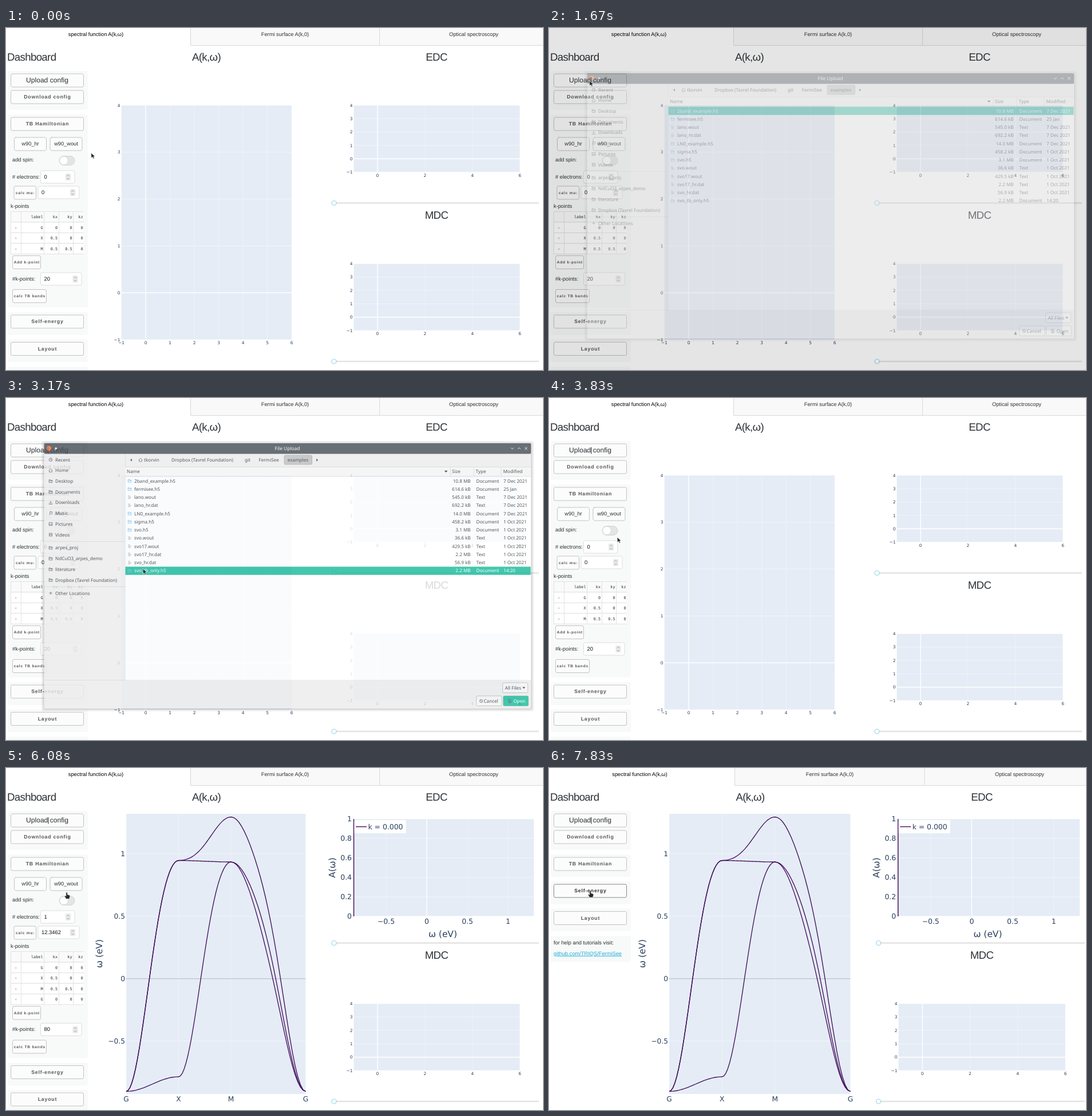
Animation of 938 by 597 pixels, one loop 8 s. Source, as an HTML page:

```html
<!DOCTYPE html>
<html lang="en">
<head>
<meta charset="utf-8">
<title>Spectral function dashboard</title>
<style>
  html, body { margin: 0; width: 100%; height: 100%; overflow: hidden; background: #fff; }
  svg { display: block; width: 938px; height: 597px; font-family: "Liberation Sans", Arial, sans-serif; fill: #2c3136; text-rendering: geometricPrecision; }
  text { white-space: pre; }
  .plot { font-family: "DejaVu Sans", sans-serif; fill: #2a3f5f; }
  .mono { font-family: "DejaVu Sans Mono", monospace; }
  .dialog { font-family: "Noto Sans", sans-serif; fill: #33383c; }
  .btn { font-weight: bold; fill: #555; }
  .btn rect { stroke: #c2c2c2; }
  .btn.on { fill: #333; }
  .btn.on rect { stroke: #888; }
</style>
</head>
<body>
<svg id="stage" viewBox="0 0 938 597"></svg>
<script>
const ANCHOR = { s: 'start', m: 'middle', e: 'end' };
const BG = '#e5ecf6', INK = '#440f5c', TEAL = '#1cbb9b';

// Text is placed by its vertical centre.
const T = (x, y, s, size = 9.27, a = 's', extra = '') =>
  `<text x="${x}" y="${y + size * .36}" font-size="${size}" text-anchor="${ANCHOR[a]}" ${extra}>${s}</text>`;
const R = (x, y, w, h, fill, stroke = 'none', r = 0, extra = '') =>
  `<rect x="${x}" y="${y}" width="${w}" height="${h}" rx="${r}" fill="${fill}" stroke="${stroke}" ${extra}/>`;
const P = (d, stroke, w = 1, extra = '') =>
  `<path d="${d}" fill="none" stroke="${stroke}" stroke-width="${w}" ${extra}/>`;
const G = (id, body, cls = '', extra = '') => `<g id="${id}" class="${cls}" ${extra}>${body}</g>`;

// ---- page ----
const heading = (x, y, s, a = 'm') => T(x, y, s, 18.6, a, 'letter-spacing="-.62"');
const slider = (x, y, x2) =>
  R(x, y - 1.2, x2 - x, 2.4, '#e3e3e3', 'none', 1.2) +
  `<circle cx="${x}" cy="${y}" r="4" fill="#fff" stroke="#96d5f0" stroke-width="1.2"/>`;

function plot({ x, xr, y, yr, xt, yt, size, gap = 6, pad = 2, names, zero = '#fff' }) {
  const [x0, x1] = x, [y0, y1] = y;
  const px = v => x0 + (v - xr[0]) / (xr[1] - xr[0]) * (x1 - x0);
  const py = v => y1 - (v - yr[0]) / (yr[1] - yr[0]) * (y1 - y0);
  const label = v => String(v).replace('-', '\u2212');
  let s = R(x0, y0, x1 - x0, y1 - y0, BG);
  xt.forEach((v, i) => {
    const isZero = !names && v === 0;
    s += P(`M${px(v)} ${y0}V${y1}`, '#fff', isZero ? 1.4 : .7, `opacity="${isZero ? 1 : .5}"`);
    s += T(px(v), y1 + gap, names ? names[i] : label(v), size, 'm');
  });
  yt.forEach(v => {
    s += P(`M${x0} ${py(v)}H${x1}`, v ? '#fff' : zero, v ? .7 : 1.4, `opacity="${v ? .65 : 1}"`);
    s += T(x0 - pad, py(v), label(v), size, 'e');
  });
  return s;
}
const emptyPlot = (x, y, xt) => plot({ x, y, xr: [-1, 6], yr: [-1, 4], xt, yt: [-1, 0, 1, 2, 3, 4], size: 7.4, gap: 5.5 });
const upright = (x, y, s) => `<g transform="translate(${x} ${y})rotate(-90)">${T(0, 0, s, 15.4, 'm')}</g>`;

function base(w) {
  const [a, b] = w ? [324.5, 656] : [322.5, 652.5];
  const mid = w ? 756 : 752;
  return R(a, -1, 620, 31.5, '#f9f9f9') + P(`M${a} 0V30.5H938M${b} 0V30`, '#d9d9d9') +
    T(w ? 158.5 : 157, 10.5, 'spectral function A(k,ω)', 9.27, 'm', 'fill="#000"') +
    T(w ? 490.5 : 487.5, 10.5, 'Fermi surface A(k,0)', 9.27, 'm') +
    T(w ? 822 : 817, 10.5, 'Optical spectroscopy', 9.27, 'm') +
    heading(w ? 351.5 : 350, 50.4, 'A(k,ω)') + heading(mid, 50.4, 'EDC') + heading(mid, 326.4, 'MDC') +
    [305.5, 582].map(y => slider(w ? 575.5 : 573, y, w ? 936 : 931)).join('') +
    `<g class="plot">${emptyPlot(w ? [610.5, 902] : [607.5, 897.5], [411.5, 528], [0, 2, 4, 6])}</g>`;
}

// Heights at G, X, M, G, then the [second, third] harmonic weights of each segment.
const BANDS = [
  [[564.5, 161.5, 85.5, 564.5], [[.08, 0], [-.13, 0], [-.16, .09]]],
  [[564.5, 161.5, 164, 564.5], [[.08, 0], [0, 0], [-.075, .06]]],
  [[564.5, 539, 164, 564.5], [[0, 0], [.08, 0], [-.14, .06]]]
];
const KPTS = [0, .2915, .584, 1];

function bandPlot(w) {
  const x = [210, w ? 526.5 : 523.5];
  let s = plot({ x, xr: [0, 1], y: [80, 569], yr: [-.923, 1.32], xt: KPTS, names: [...'GXMG'],
    yt: [-.5, 0, .5, 1], size: 12.2, gap: 9, zero: '#c3ccd2' });
  const N = 28;
  for (const [e, c] of BANDS) {
    const pts = [];
    for (let k = 0; k < 3; k++) for (let i = 0; i <= N; i++) {
      const q = Math.PI * i / N, cos = Math.cos(q);
      const f = (1 - cos) / 2 + (c[k][0] + c[k][1] * cos) * Math.sin(q) ** 2;
      const u = KPTS[k] + (KPTS[k + 1] - KPTS[k]) * i / N;
      pts.push((x[0] + u * (x[1] - x[0])).toFixed(2) + ' ' + (e[k] + (e[k + 1] - e[k]) * f).toFixed(2));
    }
    s += P('M' + pts.join('L'), INK, 1.35);
  }
  return s + upright(162.6, 324, 'ω (eV)');
}

function edcPlot(w) {
  const x0 = w ? 609.7 : 607.5, x1 = w ? 927 : 922;
  return plot({ x: [x0, x1], xr: [-.898, 1.317], y: [89, 259], yr: [0, 1], xt: [-.5, 0, .5, 1],
      yt: [0, .2, .4, .6, .8, 1], size: 12.4, gap: 9, pad: 3.5 }) +
    P(`M${x0} 89V259`, INK, 1.5) + R(x0 + 1, 91, 90, 23, '#fff') + P(`M${x0 + 3.5} 102.5h19`, INK, 1.4) +
    T(x0 + 25, 102.5, 'k = 0.000', 12.4) + T(w ? 766.5 : 763, 289.2, 'ω (eV)', 15.4, 'm') +
    upright(x0 - 37.8, 174, 'A(ω)');
}

// ---- dashboard ----
const panel = (y, h, extra = '') => R(3, y, 140, h, '#f8faf9', 'none', 3, extra);
const button = (id, x, y, w, s, size = 8.76) => G(id,
  R(x, y, w, 23, '#fbfcfb', '', 2.5) + T(x + w / 2 + .4, y + 11.2, s, size, 'm', 'letter-spacing=".8"'), 'btn');
const dashed = (x, y, w, s, size) =>
  R(x, y, w, 23, '#fbfcfb', '#888', 3, 'stroke-dasharray="1.3 1.3"') + T(x + w / 2, y + 11, s, size, 'm');
function input(id, x, y, w, value, cx) {
  const cy = y + 11.3;
  return R(x, y, w, 22, '#fff', '#dcdcdc', 2.5) + T(x + 6, cy - .8, value, 9.4, 's', `id="${id}" fill="#111"`) +
    R(cx - 4.5, cy - 6, 9, 12, '#e9e9e9', 'none', 1) +
    P(`M${cx - 2.2} ${cy - 1.6}l2.2 -2.2l2.2 2.2M${cx - 2.2} ${cy + 1.6}l2.2 2.2l2.2 -2.2`, '#888', .8);
}

const ROWS = [['label', 'kx', 'ky', 'kz'], ['G', '0', '0', '0'], ['X', '0.5', '0', '0'], ['M', '0.5', '0.5', '0'], ['G', '0', '0', '0']];
const COL = [64.5, 90, 115.5, 134.5];
const tableRow = (cells, i) => {
  const y = 320.5 + 18.5 * i;
  return G('row' + i, R(8.5, y, 127, 18.5, i ? '#fff' : '#fafafa') +
    P(`M136 ${y}H8.5V${y + 18.5}H136M26.5 ${y}v18.5M66.5 ${y}v18.5M92.5 ${y}v18.5M117.5 ${y}v18.5`, '#dcdcdc', .8) +
    (i ? T(17.3, y + 9.2, '×', 6.5, 'm', 'fill="#aaa"') : '') +
    cells.map((c, j) => T(COL[j], y + 9.2, c, 6.8, 'e')).join(''), 'mono');
};

const dashboard =
  heading(2, 50.4, 'Dashboard', 's') +
  panel(75, 68) + dashed(8.5, 80, 127, 'Upload config', 12.1) + button('dl', 8.5, 109, 127, 'Download config') +
  P('M74 86V97.5', '#222', 1, 'id="caret"') +
  panel(151, 337, 'id="tbPanel"') + button('tb', 8.5, 156, 127, 'TB Hamiltonian') +
  `<clipPath id="fold"><rect id="foldBox" x="0" y="180" width="143" height="330"/></clipPath>` +
  G('tbBody',
    dashed(14.5, 191, 56, 'w90_hr') + dashed(77, 191, 56, 'w90_wout') +
    T(11, 230, 'add spin:') + R(93, 223.5, 27, 16, '#e4e4e4', '#d4d4d4', 8) +
    '<circle cx="101" cy="231.5" r="7.3" fill="#fff" stroke="#d0d0d0" stroke-width=".7"/>' +
    T(11, 260, '# electrons:') + input('ne', 60.5, 249, 59.5, '0', 108.5) +
    button('cm', 14, 276, 38.5, 'calc mu:', 6.6) + input('mu', 56, 276, 72, '0', 116.5) +
    T(8, 311, 'k-points') + ROWS.map(tableRow).join('') +
    G('tbEnd', button('ak', 11.5, 397.5, 49, 'Add k-point', 6.6) + T(11, 437.5, '#k-points:') +
      input('nk', 60.5, 427, 71.5, '20', 121) + button('cb', 11.5, 456.5, 59, 'calc TB bands', 6.6)),
    '', 'clip-path="url(#fold)"') +
  G('low', panel(496, 40) + button('se', 8.5, 501, 127, 'Self-energy') +
    panel(543.5, 39.5) + button('ly', 8.5, 548.5, 127, 'Layout') + panel(591, 46) +
    T(8, 602.5, 'for help and tutorials visit:') +
    T(8, 621.5, 'github.com/TRIQS/FermiSee', 9.27, 's', 'fill="#1eaedb" text-decoration="underline"'));

// ---- file dialog ----
const ICON = {
  clock: 'M-2.8 0a2.8 2.8 0 1 0 5.6 0a2.8 2.8 0 1 0 -5.6 0M0 -1.6V0H1.5',
  home: 'M-3.2 .2L0 -2.8L3.2 .2M-2.3 -.4V2.8H2.3V-.4',
  folder: 'M-2.8 2.5V-2.5H-.4L.4 -1.4H2.8V2.5ZM-2.8 -.5H2.8',
  note: 'M-1.2 2V-2.6H2.4V1.4M-2.6 2H-1.2M1 1.6H2.4',
  image: 'M-2.8 -2.5H2.8V2.5H-2.8ZM-2.4 2L-.6 0L.6 1.2L1.6 .2L2.6 1.6',
  film: 'M-2.4 -2.8V2.8M2.4 -2.8V2.8M-2.4 -2.4H2.4M-2.4 0H2.4M-2.4 2.4H2.4',
  plus: 'M-2.6 0H2.6M0 -2.6V2.6',
  down: 'M0 -2.8V1M-1.6 -.6L0 1L1.6 -.6M-2.8 1.4V2.8H2.8V1.4',
  page: 'M-2.2 -2.8H1L2.2 -1.4V2.8H-2.2ZM-1 0H1M-1 1.3H1',
  lines: 'M-2.6 -2.2H.6M-2.6 0H2.6M-2.6 2.2H1.6',
  stop: 'M-2.6 0a2.6 2.6 0 1 0 5.2 0a2.6 2.6 0 1 0 -5.2 0M-1.8 -1.8L1.8 1.8'
};
const icon = (x, y, name, color = '#4c5257') => P(ICON[name], color, .8, `transform="translate(${x} ${y})"`);
const D = (x, y, s, a = 's', extra = '') => T(x, y, s, 8.1, a, extra);

const ORG = 'Dropbox (Tavrel Foundation)';
const PLACES = [
  ['Recent', 'clock'], ['Home', 'home'], ['Desktop', 'folder'], ['Documents', 'folder'], ['Downloads', 'down'],
  ['Music', 'note'], ['Pictures', 'image'], ['Videos', 'film'],
  ['arpes_proj', 'folder', 261.5], ['NdCuO3_arpes_demo', 'folder', 280.3], ['literature', 'folder', 299],
  [ORG, 'folder', 317.7], ['Other Locations', 'plus', 340.7]
];
const FILES = `2band_example.h5|10.8 MB|7 Dec 2021
fermisee.h5|614.6 kB|25 Jan
lano.wout|545.0 kB|7 Dec 2021
lano_hr.dat|692.2 kB|7 Dec 2021
LN0_example.h5|14.0 MB|7 Dec 2021
sigma.h5|458.2 kB|1 Oct 2021
svo.h5|3.1 MB|1 Oct 2021
svo.wout|36.6 kB|1 Oct 2021
svo17.wout|429.5 kB|1 Oct 2021
svo17_hr.dat|2.2 MB|1 Oct 2021
svo_hr.dat|56.9 kB|1 Oct 2021
svo_tb_only.h5|2.2 MB|14:20`.split('\n').map(l => l.split('|'));

const fileRow = ([name, size, date], i) => {
  const y = 144.6 + 14.27 * i, doc = name.endsWith('h5');
  return G('file' + i, R(208.5, y - 7.1, 708, 14.3, TEAL, 'none', 0, 'opacity="0"') +
    icon(216, y, doc ? 'folder' : 'lines', doc ? '#6fbdec' : '#8b9094') +
    D(224, y, name) + D(811.5, y, size, 'e') + D(821.5, y, doc ? 'Document' : 'Text') + D(869, y, date));
};
const dlgButton = (x, y, w) => R(x, y, w, 17.5, '#f3f4f4', '#b9bcbe', 2);

const dialog =
  [5, 3, 1.5].map(d => R(67 - d, 80 - d, 850 + 2 * d, 462 + 2 * d, '#000', 'none', 4, 'opacity=".07"')).join('') +
  R(66.5, 79, 850.5, 463, '#ececed', 'none', 2) + R(66.5, 79, 850.5, 18.5, '#475057', 'none', 2) +
  '<circle cx="75" cy="88" r="4.3" fill="#f26b3a"/>' +
  P('M85 90.3L87.2 88M86 87L88.2 89.2M87 86.6L88.8 88.4', '#fff', 1.4) +
  T(491.5, 88, 'File Upload', 8.4, 'm', 'fill="#fcfcfc"') +
  P('M882 86.8l2.4 2.4l2.4 -2.4M894 89.2l2.4 -2.4l2.4 2.4M906.2 85.8l4.4 4.4M910.6 85.8l-4.4 4.4', '#fcfcfc', .9) +
  G('trail', R(67, 117.2, 141, 18.7, '#cae6df') + R(67, 135.9, 141, 18.6, '#bfe2d9') + R(67, 154.5, 141, 18.7, '#98d8c8')) +
  PLACES.map(([s, ic, y], i) => icon(78, y || 107.7 + 18.7 * i, ic) + D(86, y || 107.7 + 18.7 * i, s)).join('') +
  P('M67 250.5H208M67 329.5H208M208.5 98V492M67 492.5H917', '#d0d2d3', .8) +
  R(486, 100, 48.5, 16, '#bcbfc1', '#a9adaf', 2) +
  '<path d="M219.8 105.7V110.7L217 108.2ZM542.2 105.7V110.7L545 108.2Z"/>' +
  icon(235, 108, 'home') + D(241, 108.2, 'tkorvin') + D(289, 108.2, ORG) + D(417, 108.2, 'git') +
  D(441.5, 108.2, 'FermiSee') + D(491.8, 108.2, 'examples') +
  R(208.5, 120.5, 708.5, 372, '#fff') + R(208.5, 120.5, 708.5, 16.5, '#f3f3f4') +
  P('M208 120.5H917M208 137H917M776 121V137M817 121V137M865 121V137', '#cfd1d2', .8) +
  '<path d="M765.5 126.8H771.5L768.5 130Z"/>' +
  D(211, 128.5, 'Name') + D(779, 128.5, 'Size') + D(820.5, 128.5, 'Type') + D(868.5, 128.5, 'Modified') +
  FILES.map(fileRow).join('') +
  dlgButton(867.5, 497, 44) + D(871.5, 506, 'All Files') + '<path d="M902 504.6H907L904.5 507.4Z"/>' +
  dlgButton(821.5, 520, 44.5) + icon(830, 529, 'stop') + D(834.5, 529, 'Cancel') +
  dlgButton(868.5, 520, 44) +
  G('open', R(868.5, 520, 44, 17.5, TEAL, 'none', 2, 'opacity="0"') + icon(880, 529, 'page') + D(886.5, 529, 'Open'));

const ARROW = 'M0 0L.5 9L2.6 7.2L4.2 10.3L5.8 9.5L4.2 6.6L7 6.2Z';
const HAND = 'M-1.2 .6Q0 -1 1.2 .6L1.4 4L5 5Q6.2 5.6 5.6 8L4.5 11.4H-1L-3.6 7.4Q-3.6 5.6 -2.3 6L-1.2 7Z';

document.getElementById('stage').innerHTML =
  R(0, 0, 938, 597, '#fff') + G('base0', base(0)) + G('base1', base(1)) +
  G('aEmpty', emptyPlot([201.5, 499], [135, 544], [-1, 0, 1, 2, 3, 4, 5, 6]), 'plot') +
  G('eEmpty', emptyPlot([607.5, 897.5], [135, 251.5], [0, 2, 4, 6]), 'plot') +
  G('a0', bandPlot(0), 'plot') + G('a1', bandPlot(1), 'plot') +
  G('e0', edcPlot(0), 'plot') + G('e1', edcPlot(1), 'plot') + dashboard +
  R(0, 0, 938, 597, '#000', 'none', 0, 'id="dim"') + G('dlg', dialog, 'dialog') +
  `<path id="cursor" fill="#26282a" stroke="#fff" stroke-width=".6"/>`;

// ---- motion, in ticks of 1/12 s ----
const LOOP = 8000;
const CURSOR = [[5, 148.5, 218], [15, 70.5, 92], [20, 70.5, 92], [25, 228.5, 225], [27, 228.5, 225], [32, 239, 298],
  [40, 239, 298], [46, 119, 243], [72, 119, 243], [73, 106, 217], [79, 72, 163.5], [86, 72, 163.5], [92, 72, 214.5]];
const DIALOG = [[19, 0], [22, 1], [37, 1], [38, .82], [39, .45], [41, 0]];
const DIM = [[19, 0], [23, .4], [37, .4], [38, 0]];
const TRAIL = [[21, 0], [24, 1], [27, 1], [30, 0]];
const OPEN = [[34, 0], [36, 1]];
const FOLD = [[84, 0], [89, 1]];

function at(keys, k, col = 1, ease = u => u) {
  if (k <= keys[0][0]) return keys[0][col];
  for (let i = 1; i < keys.length; i++) {
    const a = keys[i - 1], b = keys[i];
    if (k <= b[0]) return a[col] + (b[col] - a[col]) * ease((k - a[0]) / (b[0] - a[0]));
  }
  return keys[keys.length - 1][col];
}
const smooth = u => u * u * (3 - 2 * u);
const el = id => document.getElementById(id);
const show = (id, on) => el(id).style.display = on ? '' : 'none';
const attr = (id, name, v) => el(id).setAttribute(name, v);

function draw(k) {
  const loaded = k >= 52, wide = k >= 90;
  show('base0', !wide); show('base1', wide);
  show('aEmpty', k < 64); show('a0', k >= 64 && !wide); show('a1', wide);
  show('eEmpty', k < 61); show('e0', k >= 61 && !wide); show('e1', wide);
  show('caret', (k >= 17 && k < 52) || k >= 66);

  el('ne').textContent = loaded ? '1' : '0';
  el('mu').textContent = loaded ? '12.3462' : '0';
  el('nk').textContent = loaded ? '80' : '20';
  show('row4', k >= 53);
  const grow = k >= 53 ? 18.5 : 0;
  const low = grow - 316.5 * at(FOLD, k, 1, smooth);
  attr('tbEnd', 'transform', `translate(0 ${grow})`);
  attr('low', 'transform', `translate(0 ${low})`);
  attr('tbPanel', 'height', 337 + low);
  attr('foldBox', 'height', Math.max(0, 305 + low));

  attr('dim', 'opacity', at(DIM, k));
  attr('dlg', 'opacity', at(DIALOG, k));
  attr('trail', 'opacity', at(TRAIL, k));
  for (const [i, on] of [[0, k < 33], [11, k >= 33]]) {
    attr('file' + i, 'fill', on ? '#f4fffc' : '#33383c');
    el('file' + i).firstChild.setAttribute('opacity', on ? 1 : 0);
  }
  el('open').firstChild.setAttribute('opacity', at(OPEN, k));
  attr('open', 'fill', k >= 35 ? '#f4fffc' : '#33383c');

  const x = at(CURSOR, k, 1, smooth), y = at(CURSOR, k, 2, smooth);
  attr('cursor', 'd', k >= 73 ? HAND : ARROW);
  attr('cursor', 'transform', `translate(${x} ${y})`);
  const free = k < 20 || k > 41;
  for (const [id, top] of [['dl', 109], ['tb', 156], ['se', 501 + low]]) {
    const over = free && Math.abs(x - 72) < 64 && y >= top && y <= top + 23;
    el(id).classList.toggle('on', over || (id === 'tb' && k >= 79 && k < 94));
  }
}

const start = performance.now();
function frame(now) {
  const t = Math.max(0, now - start) % LOOP;
  draw(Math.floor((t + 4) * .012) % 96);
  requestAnimationFrame(frame);
}
draw(0);
requestAnimationFrame(frame);
</script>
</body>
</html>
```
